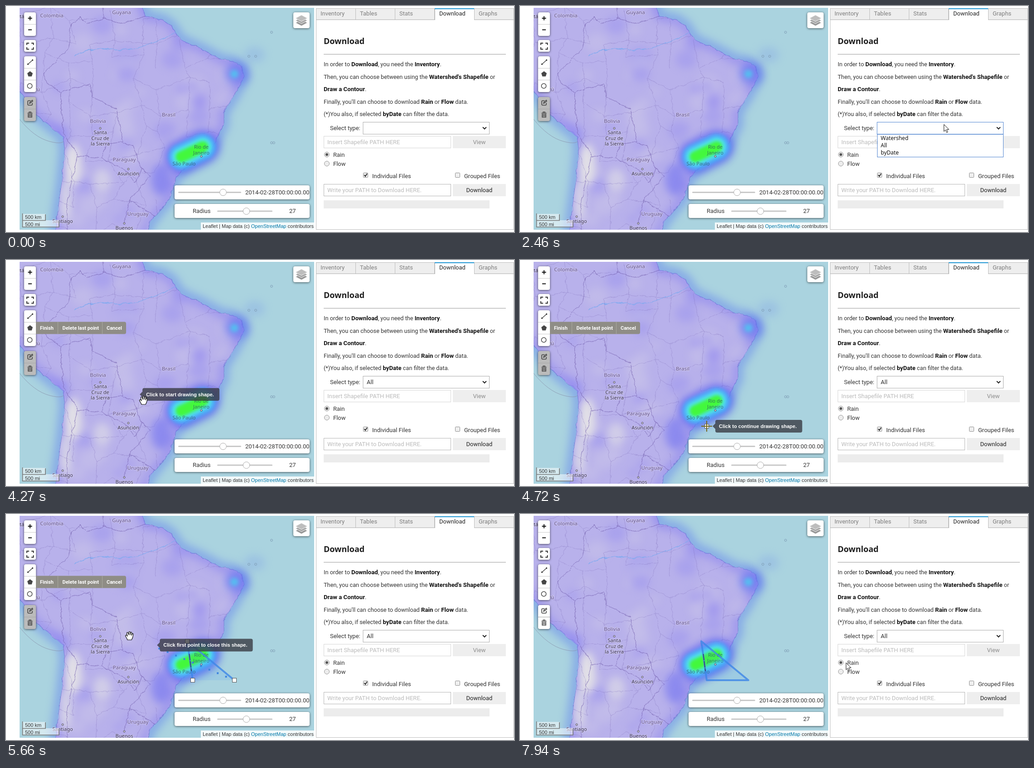
An HTML page that plays this animation: 1121 by 499 pixels, repeating every 8 s.

```html
<!DOCTYPE html>
<html lang="en">
<head>
<meta charset="utf-8">
<title>Rain map download</title>
<style>
html, body { margin: 0; width: 100%; height: 100%; overflow: hidden; background: #fff; }
svg { position: absolute; left: 0; top: 0; }
#base { will-change: transform; }
text { font: 13px Roboto, sans-serif; fill: #333; white-space: pre; }
.para text { font-size: 12.75px; }
.para tspan { font-size: 13.2px; font-weight: 700; fill: #111; }
.map text { font: 11.5px "Noto Sans", sans-serif; text-anchor: middle; fill: #5f4f88;
  paint-order: stroke; stroke: #ddd8f4; stroke-opacity: .6; stroke-width: 2px; }
.map .city { fill: #36304f; font-size: 11px; }
.map .hot { fill: #2e5a68; stroke: none; fill-opacity: .8; }
.small text { font: 11px "Liberation Sans", Arial, sans-serif; }
.tip text { font: bold 11px "Liberation Sans", Arial, sans-serif; fill: #fff; }
.bar text { font: bold 11px Roboto, sans-serif; fill: #fff; }
.list text { font: 12px "Noto Sans", sans-serif; fill: #111; }
.faint { fill: #bbb; }
.mid { text-anchor: middle; }
.shadow { filter: drop-shadow(0 1px 2.5px rgba(0,0,0,.6)); }
.soft { filter: blur(9px); }
</style>
</head>
<body>
<svg id="base" width="1121" height="499">
  <defs>
    <clipPath id="frame"><rect x="30" y="4" width="650" height="490"/></clipPath>
    <path id="land" d="M-30-40H285L308 22 345 30 365 43 385 74 430 94 475 118 500 122 519 134 525 158 505 195 480 235 480 262 455 315 440 331 387 364 375 380 360 426 320 475 290 540H103L123 390 130 320 126 290 60 234 26 180-30 150Z"/>
    <clipPath id="shore"><use href="#land"/></clipPath>
    <filter id="rough" filterUnits="userSpaceOnUse" x="0" y="0" width="680" height="499" color-interpolation-filters="sRGB">
      <feTurbulence type="fractalNoise" baseFrequency=".07" numOctaves="3" seed="4"/>
      <feDisplacementMap in="SourceGraphic" scale="8" xChannelSelector="R" yChannelSelector="G"/>
    </filter>
  </defs>
  <g clip-path="url(#frame)" class="map">
    <rect x="30" y="4" width="650" height="490" fill="#aad3df"/>
    <use href="#land" fill="none" stroke="#5a78f0" stroke-width="26" stroke-opacity=".42" class="soft"/>
    <ellipse cx="548" cy="108" rx="24" ry="18" fill="#8fb4e4" opacity=".5" class="soft"/>
    <path d="M30 250Q62 290 96 299T130 292" fill="none" stroke="#8a93ad" stroke-width=".8"/>
    <use href="#land" fill="#b8b1eb" stroke="#7a83d8" stroke-width="1.2" filter="url(#rough)"/>
    <g clip-path="url(#shore)">
      <use href="#land" fill="none" stroke="#7a74f0" stroke-width="22" opacity=".38" class="soft"/>
      <g id="mottle" class="soft"></g>
      <g fill="#e2e0e6" class="soft">
        <ellipse cx="148" cy="350" rx="18" ry="46"/>
        <ellipse cx="132" cy="430" rx="12" ry="48" opacity=".8"/>
        <ellipse cx="212" cy="385" rx="20" ry="26" opacity=".6"/>
      </g>
      <g fill="none" filter="url(#rough)">
        <path d="M150 112Q190 88 235 96T378 58" stroke="#7faaf0" stroke-width="1.3"/>
        <path id="states" stroke="#8573bd" stroke-width=".7" opacity=".55"/>
        <path stroke="#7561ae" opacity=".75" d="M215 0V28L180 40 165 25 140 45V90L82 150 92 170 120 190 185 172 190 200 245 228 258 300 280 310 300 360 318 375 272 430 335 468M215 28L262 38 308 22M120 190L127 280 158 330 210 335 222 305 258 300M210 335L268 365 285 390 300 360M158 330L135 430V496M272 430L262 480"/>
      </g>
    </g>
    <ellipse cx="342" cy="383" rx="22" ry="36" fill="#6a6cf2" opacity=".55" class="soft"/>
    <ellipse cx="509" cy="149" rx="27" ry="25" fill="#5f70f2" opacity=".62" class="soft"/>
    <circle cx="504" cy="150" r="9" fill="#55bdf0" style="filter:blur(4px)"/>
    <g id="heat" stroke-linecap="round"></g>
    <g id="places"></g>
  </g>
  <g id="controls"></g>
  <g class="small">
    <rect x="430" y="478" width="250" height="16" fill="#fff" fill-opacity=".85"/>
    <text x="434" y="490">Leaflet | Map data (c) <tspan fill="#0078a8">OpenStreetMap</tspan> contributors</text>
    <path d="M36 459h51v14h30v15H36z" fill="#fff" fill-opacity=".5"/>
    <path d="M36.500 458v30H117V475M36 473.500H87V460" fill="none" stroke="#777" stroke-width="1.6"/>
    <text x="42" y="470">500 km</text><text x="42" y="486">500 mi</text>
  </g>
  <g id="panel"></g>
  <g class="para">
    <text x="701" y="133">In order to <tspan>Download</tspan>, you need the <tspan>Inventory</tspan>.</text>
    <text x="701" y="161">Then, you can choose between using the <tspan>Watershed's Shapefile</tspan> or</text>
    <text x="701" y="188"><tspan>Draw a Contour</tspan>.</text>
    <text x="701" y="216">Finally, you'll can choose to download <tspan>Rain</tspan> or <tspan>Flow</tspan> data.</text>
    <text x="701" y="243">(*)You also, if selected <tspan>byDate</tspan> can filter the data.</text>
  </g>
</svg>

<svg id="live" width="1121" height="499">
  <g class="shadow"><rect x="40" y="201" width="26" height="53" rx="4" id="edit"/></g>
  <path d="M40 227.500h26" stroke="#a8a8a8"/>
  <g fill="none" stroke="#464646" stroke-width="1.6">
    <path d="M54 209h-4q-2 0-2 2v6q0 2 2 2h6q2 0 2-2v-3M52 215l1-3 5-4 1 2-5 4z"/>
    <path d="M47.500 236.500h11M51 235.500v-1.500h4v1.500M49 238v7.500h8V238M51.500 238v6M54.500 238v6"/>
  </g>
  <g clip-path="url(#frame)">
    <path id="shape" stroke="#3e86e8" stroke-width="4" stroke-opacity=".8" fill="#3388ff" stroke-linejoin="round"/>
    <path id="seam" d="M404.500 309L409 347" stroke="#37405c" stroke-width="1.6" stroke-dasharray="14 2"/>
    <g id="guide"></g>
    <g id="marks"></g>
    <g id="bar" class="bar">
      <path d="M66 136.500h195q4 0 4 4v19q0 4-4 4H66z" fill="#8f8d86"/>
      <path d="M114.500 137v26M212.500 137v26" stroke="#aaa9a0"/>
      <text x="75" y="154">Finish</text><text x="124.500" y="154">Delete last point</text><text x="222" y="154">Cancel</text>
    </g>
    <g id="tip" class="tip"><path id="bubble" fill="#37383f" fill-opacity=".78"/><text id="hint" x="14" y="4"></text></g>
  </g>
  <rect id="field" x="788" y="256.500" width="278.500" height="26.500" fill="#fff"/>
  <text id="choice" x="796" y="274">All</text>
  <path d="M1052 267.500l4 4 4-4" fill="none" stroke="#222" stroke-width="2"/>
  <g id="list" class="list">
    <rect x="788.500" y="283.500" width="278" height="50" fill="#fff" stroke="#4f84d0"/>
    <rect id="hover" x="789" y="300" width="277" height="16" fill="#1e90ff"/>
    <text x="796" y="296">Watershed</text><text id="allRow" x="796" y="312">All</text><text x="796" y="328">byDate</text>
  </g>
  <circle id="dot" cx="708" r="3" fill="#555"/>
  <g id="cursor" stroke="#111" fill="#fff" stroke-linejoin="round">
    <path id="arrow" d="M.5.5V16L4 12.700 6.500 18.500 9 17.400 6.500 11.700H11.500Z"/>
    <path id="hand" stroke-width="1.2" d="M-4 9C-5 5-8 2-8.500 0-8.500-2.500-5-2-4 1L-5.500-5C-6-8-3-8.500-2.500-6L-1-2V-8C-1-10 2-10 2-8V-2L3-7C3.500-9 6-8.500 5.600-6L5-1 6.500-4C7.500-6 9.500-5 8.800-3 8.500 1 7.500 5 5 9Z"/>
    <path id="cross" d="M-12 0H12M0-12V12" stroke="#75691c" stroke-width="2"/>
  </g>
</svg>

<script>
const $ = id => document.getElementById(id);
const add = (id, markup) => $(id).insertAdjacentHTML('beforeend', markup);
const rect = (x, y, w, h, fill, stroke = 'none', r = 0) =>
  `<rect x="${x}" y="${y}" width="${w}" height="${h}" rx="${r}" fill="${fill}" stroke="${stroke}"/>`;
const label = (x, y, s, attrs = '') => `<text x="${x}" y="${y}" ${attrs}>${s}</text>`;
const ring = (x, y, r, fill, stroke, attrs = '') =>
  `<circle cx="${x}" cy="${y}" r="${r}" fill="${fill}" stroke="${stroke}" ${attrs}/>`;
const show = (id, on) => { $(id).style.display = on ? '' : 'none'; };

// Map: seeded rain patches and a jittered net of state borders
let seed = 11;
const rnd = () => (seed = seed * 16807 % 2147483647) / 2147483647;
for (let i = 0; i < 70; i++) {
  const r = 8 + rnd() * 14;
  add('mottle', `<ellipse cx="${40 + rnd() * 450}" cy="${rnd() * 490}" rx="${r * 1.2}" ry="${r}" fill="${i % 2 ? '#958cf0' : '#cdc8e9'}" opacity=".4"/>`);
}
const CELL = 52, COLS = 10;
const nodes = Array.from({ length: COLS * COLS }, (_, i) =>
  [(i % COLS + .3 + rnd() * .7) * CELL, (Math.floor(i / COLS) + rnd() * .7) * CELL]);
let net = '';
nodes.forEach((p, i) => {
  if (i % COLS < COLS - 1 && rnd() < .75) net += `M${p}L${nodes[i + 1]}`;
  if (i + COLS < nodes.length && rnd() < .75) net += `M${p}L${nodes[i + COLS]}`;
});
$('states').setAttribute('d', net);

['#5058f2', '#48b4fb', '#4ee8ea', '#43f83c'].forEach((color, i) =>
  add('heat', `<path d="M387 333L434 311" stroke="${color}" stroke-width="${76 - i * 17}" opacity="${.65 + i * .12}" style="filter:blur(${i ? 3.5 : 9}px)"/>`));

const place = (x, y, s, kind = '') => add('places', label(x, y, s, `class="${kind}"`));
place(101, 25, 'Colombia');
place(255, 18, 'Guyana');
place(359, 244, 'Brasil');
place(203, 258, 'Bolivia');
place(261, 343, 'Paraguay');
place(291, 463, 'Uruguay');
place(69, 188, 'rú');
place(35, 27, 'tá', 'city');
['Santa', 'Cruz de', 'la Sierra'].forEach((s, i) => place(208, 283 + i * 12.5, s, 'city'));
['Rio de', 'Janeiro'].forEach((s, i) => place(431, 315 + i * 13, s, 'city hot'));
place(393, 352, 'São Paulo', 'city hot');
const town = (x, y, s) => {
  place(x, y + 14, s, 'city');
  add('places', ring(x, y, 2, '#ddd', '#4a4460'));
};
town(208, 270, '');
town(270, 360, 'Asunción');
town(125, 465, 'Santiago');
town(261, 480, 'Buenos');
town(431, 332, '');
const islet = (x, y) => add('places', ring(x, y, 2.4, 'none', '#7f9db5'));
islet(586, 58);
for (const k of [0, 1]) { islet(536 + k * 15, 111); islet(586 + k * 5, 302); }

// Map controls
const card = (...box) => `<g class="shadow">${rect(...box, '#fff', 'none', 4)}</g>`;
const slider = (x, w, y, knob) => rect(x, y - 1.5, w, 3, '#c9c9c9', 'none', 1.5) + ring(knob, y, 7.300, '#fff', '#aaa');
add('controls', card(40, 14, 26, 52) + card(40, 75, 26, 26) + card(40, 111, 26, 79) + card(634, 14, 36, 35) +
  card(372, 396, 298, 31) + card(372, 437, 298, 31) +
  `<path d="M40 40.500h26M40 137.500h26M40 163.500h26" stroke="#ccc"/>
  <path d="M48.500 27h9M53 22.500v9M49 52.500h8" stroke="#111" stroke-width="2"/>
  <path d="M46 86v-4h5M56 82h4.500v4M60.500 91v4.500H56M51 95.500h-5V91" fill="none" stroke="#333" stroke-width="2"/>
  <path d="M49 128l9-8" stroke="#464646" stroke-width="1.5"/><path d="M47 127h3v3h-3zM57 118h3v3h-3zM53 144l6 4.500-2.300 7h-7.400L47 148.500z" fill="#464646"/>` +
  ring(52.5, 176.500, 5.200, 'none', '#464646', 'stroke-width="1.5"') +
  slider(380, 139, 411.500, 479) + slider(466, 122, 453, 530.500) +
  label(528, 416, '2014-02-28T00:00:00.00') + label(412, 457, 'Radius') + label(625, 457, '27'));
['#979797', '#a8a8a8', '#bdbdbd'].forEach((c, i) =>
  add('controls', `<path d="M652 ${30 - i * 5}l13 7-13 7-13-7z" fill="${c}" stroke="#f4f4f4"/>`));

// Side panel
add('panel', rect(684.5, 30.5, 436, 463, '#fff', '#bdbdbd'));
['Inventory', 'Tables', 'Stats', 'Download', 'Graphs'].forEach((name, i) => {
  const x = Math.round(684 + i * 87.200), on = i === 3;
  add('panel', rect(x + .5, 5.500, 87, 24.700, on ? '#fff' : '#eee', '#bdbdbd') +
    (on ? rect(x + 1, 28, 86, 4, '#fff') + rect(x, 5, 88, 2, '#2196d3') : '') +
    label(x + 10, 21, name, `style="fill:${on ? '#222' : '#7d7d7d'}"`));
});
const inputRow = (y, hint, button, border, color) =>
  rect(701.5, y + .5, 280, 26, '#fff', border) + label(709, y + 18, hint, 'class="faint"') +
  rect(986, y, 117, 27, '#eee') + label(1044.500, y + 18, button, `class="mid" style="fill:${color}"`);
const radio = (y, name) => ring(708, y, 5.500, '#ededed', '#999') + label(722, y + 5, name);
const check = (x, name) => rect(x + .5, 368.500, 10, 10, '#efefef', '#8c8c8c', 1) + label(x + 20, 380, name);
add('panel', label(701, 84, 'Download', `style="font:bold 18px 'Noto Sans',sans-serif;fill:#1d1d1d"`) +
  rect(701, 106, 402, 1, '#999') + label(715, 274, 'Select type:') +
  inputRow(287, 'Insert Shapefile PATH HERE', 'View', '#d6d6d6', '#8d8d8d') +
  inputRow(393, 'Write your PATH to Download HERE.', 'Download', '#b5b5b5', '#222') +
  radio(328, 'Rain') + radio(348, 'Flow') + check(788, 'Individual Files') + check(991, 'Grouped Files') +
  '<path d="M790.500 373l2.500 3 4-6" fill="none" stroke="#333" stroke-width="2"/>' +
  rect(701, 429, 366, 18, '#ececec'));

// Pointer: each move runs from one time to another and ends at a spot
const LOOP = 8000, TICK = 72, LAG = 30;
const ENTRY = [953, 440], POLYGON = [53, 150], FINISH = [90, 150];
const corners = [{ at: 4650, p: [412, 367] }, { at: 5100, p: [400, 281] }, { at: 5480, p: [504, 367] }];
const [first, second, third] = corners.map(c => c.p);
const moves = [
  [216, 576, [764, 201]],
  [936, 1584, [1000, 14]],
  [1728, 2088, [935, 261]],
  [2448, 2664, [925, 305]],
  [2952, 3744, POLYGON],
  [3888, 4248, [303, 310]],
  [4248, 4608, first],
  [4752, 5040, second],
  [5112, 5160, [405, 288]],
  [5184, 5400, third],
  [5472, 5616, [272, 269]],
  [5616, 6048, FINISH],
  [6336, 7128, [720, 372]],
  [7200, 7272, [720, 349]],
  [7488, 7704, [719, 328]]];
const ease = f => f * f * (3 - 2 * f);
function pointer(t) {
  let [x, y] = ENTRY;
  for (const [from, to, [tx, ty]] of moves) {
    if (t <= from) break;
    let f = Math.min(1, (t - from) / (to - from));
    if (to - from > 700) f = ease(f);
    x += (tx - x) * f;
    y += (ty - y) * f;
  }
  return [x, y];
}

const START = 3860, END = 6330;
const hints = ['Click to start drawing shape.', 'Click to continue drawing shape.',
  'Click to continue drawing shape.', 'Click first point to close this shape.'];
const hintWidths = hints.map(s => {
  $('hint').textContent = s;
  return $('hint').getComputedTextLength() + 22;
});

function drawTip(n, x, y) {
  $('tip').setAttribute('transform', `translate(${x + 13} ${y})`);
  $('bubble').setAttribute('d', `M0 0L6-6V-10q0-4 4-4H${hintWidths[n]}q4 0 4 4V10q0 4-4 4H10q-4 0-4-4V6Z`);
  $('hint').textContent = hints[n];
}

function drawShape(t, q) {
  const drawing = t >= START && t < END;
  const pts = corners.filter(c => t >= c.at).map(c => c.p);
  const n = pts.length;
  $('shape').setAttribute('d', n ? 'M' + pts.join('L') + (t >= END ? 'Z' : '') : '');
  $('shape').setAttribute('fill-opacity', n > 2 ? .1 : 0);
  show('seam', n > 1);
  $('marks').innerHTML = drawing ? pts.map(([x, y]) => rect(x - 4.500, y - 4.500, 9, 9, '#fff', '#555')).join('') : '';
  show('bar', drawing);

  const [mx, my] = pointer(q - LAG);
  let dots = '';
  if (drawing && n) {
    const [x, y] = pts[n - 1], d = Math.hypot(mx - x, my - y);
    for (let s = 20; s < d; s += 20)
      dots += rect(x + (mx - x) * s / d - 2, y + (my - y) * s / d - 2, 4, 4, '#3d84e0');
  }
  $('guide').innerHTML = dots;
  show('tip', drawing && mx > 95);
  drawTip(n, mx, my);
}

function draw(t) {
  const q = Math.floor(t / TICK) * TICK;
  const [x, y] = pointer(q);
  const open = t >= 2220 && t < 3000, hover = open && y > 299;
  show('list', open);
  show('hover', hover);
  $('allRow').style.fill = hover ? '#fff' : '#111';
  $('field').setAttribute('stroke', open ? '#4f84d0' : '#a9a9a9');
  show('choice', t >= 3000);
  $('edit').setAttribute('fill', t >= 6420 ? '#fff' : '#bbb');
  $('dot').setAttribute('cy', t >= 7410 && t < 7880 ? 348 : 328);
  drawShape(t, q);

  const onMap = x < 682, cross = t >= 4400 && t < 5500;
  show('cursor', t >= 210);
  show('arrow', !onMap);
  show('hand', onMap && !cross);
  show('cross', onMap && cross);
  $('cursor').setAttribute('transform', `translate(${x} ${y})`);
}

const begin = performance.now();
function frame() {
  draw((performance.now() - begin) % LOOP);
  requestAnimationFrame(frame);
}
frame();
</script>
</body>
</html>
```
